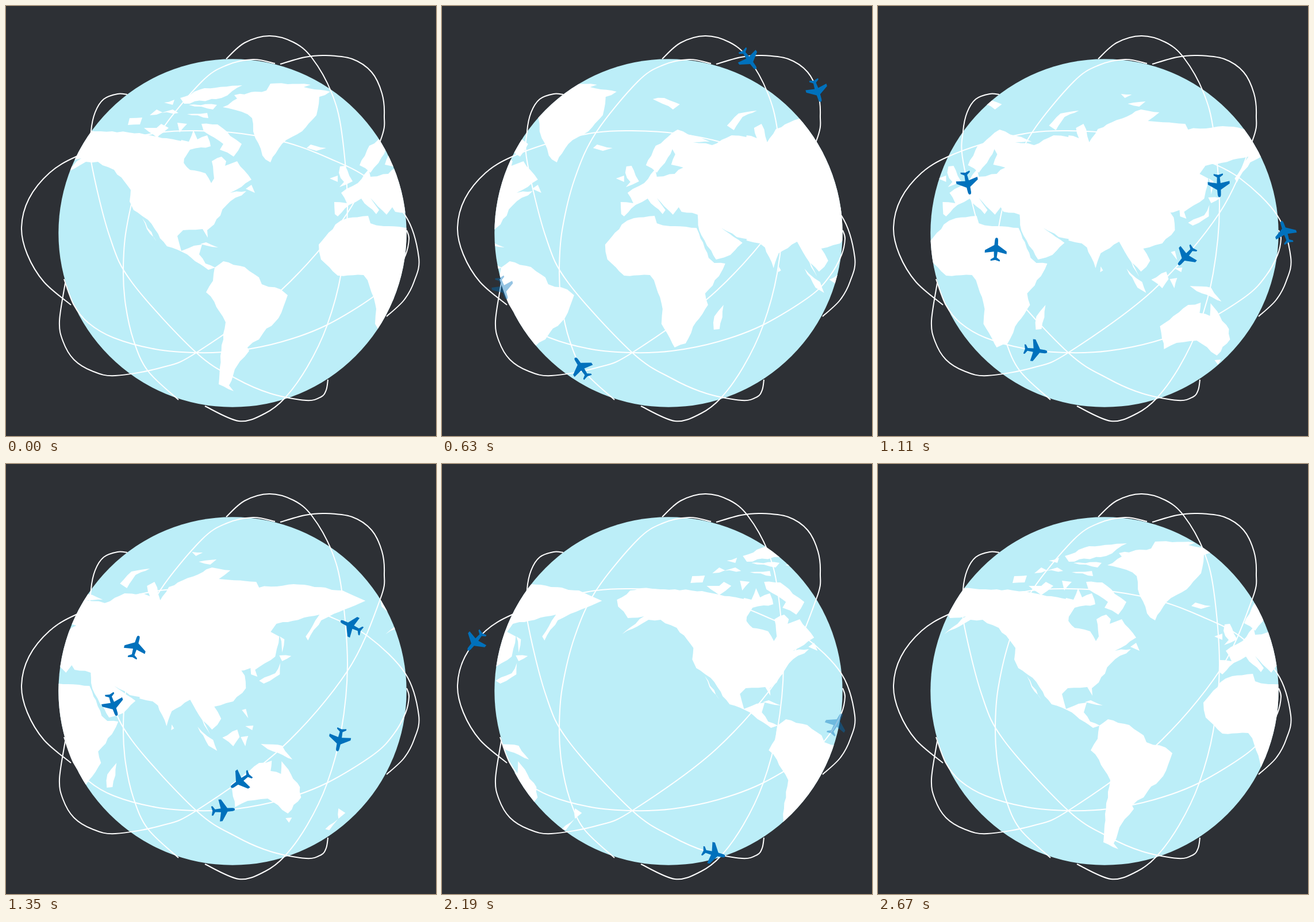
Recreate the animation shown at these times as an HTML page. Size 748x748 px, loop 2.7 s.

```html
<!DOCTYPE html>
<html lang="en">
<head>
<meta charset="utf-8">
<title>Flights around the globe</title>
<style>
  html, body { margin: 0; width: 100%; height: 100%; overflow: hidden; background: #2d3035; }
  svg { display: block; width: 100vw; height: 100vh; }
</style>
</head>
<body>
<svg viewBox="0 0 748 748">
  <defs><clipPath id="disc"><circle cx="394" cy="395" r="302.7"/></clipPath></defs>
  <circle cx="394" cy="395" r="302.7" fill="#bceef8"/>
  <g clip-path="url(#disc)">
    <g id="world" fill="#fff">
      <g id="map"></g>
      <use href="#map" x="1125"/>
    </g>
  </g>
  <g id="orbits" fill="none" stroke="#fff" stroke-width="2"></g>
  <g id="planes" fill="#0071bc"></g>
</svg>
<script>
const LOOP = 2700, STEP = 30, SCROLL = 0.4131, FADE = 120, CRUISE = 0.55;
const STOP_TIMES = [630, 900, 1350, 1800, 2190];
const $ = id => document.getElementById(id);

function add(parent, d) {
  const path = document.createElementNS('http://www.w3.org/2000/svg', 'path');
  path.setAttribute('d', d);
  return $(parent).appendChild(path);
}

const points = text => text.trim().split(/\s+/).map(p => p.split(',').map(Number));

let seed = 7;
const random = () => (seed = seed * 16807 % 2147483647) / 2147483647;

// Breaks long coast segments into slightly ragged ones
function ragged(pts) {
  return pts.flatMap((a, i) => {
    const b = pts[(i + 1) % pts.length];
    const n = Math.floor(Math.hypot(b[0] - a[0], b[1] - a[1]) / 9);
    const extra = Array.from({ length: Math.max(0, n - 1) }, (_, j) =>
      a.map((v, k) => v + (b[k] - v) * (j + 1) / n + (random() - 0.5) * 3));
    return [a, ...extra];
  });
}

// Coastlines; "/" separates islands, dx places the group on the map strip
function land(dx, coasts) {
  const d = coasts.split('/').map(c => `M${ragged(points(c)).join(' ')}Z`).join('');
  add('map', d).setAttribute('transform', `translate(${dx})`);
}

// North America, west and east
land(0, `107,220 126,216 232,221 318,238 309,275 335,300 298,400 305,426 327,417 341,415 336,432 347,448 364,455 352,459
  315,432 280,418 247,372 222,355 215,340 217,320 188,285 160,271 139,271 93,296 131,265 103,268 86,248 84,236
  / 237,369 262,410 245,388`);
land(0, `305,233 318,236 326,216 333,232 350,225 356,244 320,250 307,270 318,285 347,291 357,308 362,300 358,270 375,262
  383,270 381,278 402,270 427,302 390,325 418,322 383,347 362,380 350,390 351,403 342,388 308,390 298,400 280,340
  / 417,318 427,311 433,325 / 338,414 348,411 369,420`);
// Arctic islands
land(0, `215,195 237,194 233,206 212,207 / 240,212 262,212 270,205 283,212 262,228 / 250,190 262,180 272,185
  / 270,186 290,180 300,186 / 275,168 293,163 290,172 / 303,160 345,143 411,138 375,160 310,170
  / 318,172 367,172 360,180 / 315,188 350,186 352,195 / 298,203 315,205 302,220`);
land(0, '340,205 368,206 390,226 410,240 396,262 372,250 378,240 344,218');
// Greenland, Iceland
land(0, `377,176 402,161 397,155 453,147 460,135 530,137 518,141 564,149 545,158 540,190 515,218 480,240 460,272 446,260
  430,218 428,195 410,184 / 523,247 530,241 557,247 540,252`);
// South America
land(0, `363,455 378,444 415,454 440,472 445,484 478,493 490,503 474,543 448,568 440,580 420,594 423,600 407,618 398,632
  388,660 396,670 370,658 375,590 382,550 356,505 348,498 360,478`);
// Africa
land(372, `201,380 222,369 258,365 262,378 285,383 331,386 352,438 362,447 381,448 370,470 346,500 351,520 330,550
  312,587 293,594 270,553 272,527 257,477 250,468 205,469 176,441 172,415 / 378,520 371,562 361,563 362,540`);
// Europe and Arabia
land(372, `199,341 221,343 211,325 240,308 259,284 262,297 293,292 308,281 287,276 294,258 289,249 276,273 262,290 243,277
  260,243 298,215 354,236 325,237 358,242 392,225 418,228 445,235 445,409 401,402 374,386 411,412 390,433 365,441
  336,391 333,363 305,358 300,350 290,363 262,334 277,355 272,362 246,335 225,346 205,366 200,362`);
land(372, '207,290 209,279 218,278 231,305 208,315 216,306 / 191,300 205,295 205,306 / 255,162 275,160 302,171 290,180');
// Asia, north and south
land(558, `232,225 250,230 245,212 258,205 268,237 283,214 358,180 390,185 370,200 435,205 440,215 500,209 585,220 625,238
  580,257 548,272 525,307 521,300 545,262 490,275 470,278 460,292 475,300 468,335 433,358 437,370 426,366 425,355
  403,360 232,380`);
land(558, `232,350 403,350 415,368 417,390 395,413 362,422 374,443 358,462 343,447 355,471 330,428 320,410 288,430 279,456
  264,420 255,413 232,408`);
land(558, `288,453 292,460 287,463 / 476,300 484,305 480,328 / 475,333 496,334 480,343
  / 440,377 468,364 477,346 476,366 448,382 / 198,208 218,187 250,182 225,193 210,216
  / 323,153 342,154 330,160 / 335,170 366,166 355,175`);
// South-east Asia
land(558, `333,457 360,480 367,499 352,490 / 376,476 402,462 406,475 395,491 / 408,475 421,473 416,491
  / 410,428 417,426 421,442 / 416,456 430,455 428,463 / 443,487 480,490 498,514 455,496`);
// Oceania
land(558, `391,557 440,520 462,516 460,534 478,539 479,517 511,562 513,580 490,608 455,582 420,586 398,597
  / 486,616 497,615 492,624 / 578,599 590,607 578,617 / 577,618 562,637 555,635`);

// Smooth curve through points
function spline(pts) {
  const at = i => pts[Math.max(0, Math.min(pts.length - 1, i))];
  let d = `M${pts[0]}`;
  for (let i = 0; i < pts.length - 1; i++) {
    const [a, b, c, e] = [at(i - 1), at(i), at(i + 1), at(i + 2)];
    const c1 = b.map((v, k) => v + (c[k] - a[k]) / 6);
    const c2 = c.map((v, k) => v - (e[k] - b[k]) / 6);
    d += `C${c1} ${c2} ${c}`;
  }
  return d;
}

function nearestLength(path, [x, y]) {
  let best = 0, min = Infinity;
  for (let l = 0, total = path.getTotalLength(); l <= total; l++) {
    const p = path.getPointAtLength(l), dist = Math.hypot(p.x - x, p.y - y);
    if (dist < min) { min = dist; best = l; }
  }
  return best;
}

const half = points('20,0 19,2 16,2.8 7,3.2 -3,19 -7.5,19 -4.5,3.2 -14.5,2.4 -18.5,8.2 -21,8 -19,0');
const PLANE = `M${[...half, ...half.map(([x, y]) => [x, -y]).reverse()].join(' ')}Z`;

// An orbit and the plane that passes the stops between times from and to
const flights = [];
function flight(from, to, orbit, stops) {
  const path = add('orbits', spline(points(orbit)));
  const times = STOP_TIMES.filter(t => t > from);
  const keys = points(stops).map((p, i) => ({ t: times[i], l: nearestLength(path, p) }));
  const first = keys[0], last = keys[keys.length - 1];
  keys.unshift({ t: from, l: Math.max(0, first.l - (first.t - from) * CRUISE) });
  keys.push({ t: to, l: Math.min(path.getTotalLength(), last.l + (to - last.t) * CRUISE) });
  keys.forEach((k, i) => {
    const a = keys[Math.max(0, i - 1)], b = keys[Math.min(keys.length - 1, i + 1)];
    k.v = (b.l - a.l) / (b.t - a.t);
  });
  flights.push({ path, keys, from, to, icon: add('planes', PLANE) });
}

flight(150, 1825, '383,92 415,64 458,52 500,63 532,90 566,150 584,220 594,350 583,465 558,557 524,628 485,682 450,709 405,722 346,696',
  '535,93 575,182 579,480 405,721');
flight(440, 2150, '300,685 247,635 222,582 208,520 204,460 209,390 231,300 268,220 340,132 384,103 430,93 468,100',
  '243,628 207,518 228,319 316,157');
flight(230, 2150, `477,101 520,89 556,86 602,92 636,115 654,152 658,190 651,235 594,360 478,495 331,603 270,629 190,643
  150,635 118,615 99,583 93,548 103,482`, '652,148 622,311 408,552 150,634');
flight(700, 2430, '211,154 194,153 170,162 155,185 148,218 148,270 180,400 220,482 331,603 400,648 460,674 522,686 548,680 557,668 560,650',
  '148,210 185,419 326,598 473,678');
flight(850, 2560, `662,540 692,512 710,479 718,437 695,365 630,300 560,264 490,238 410,222 330,217 268,220 195,236 122,262
  76,290 40,335 27,385 37,432 66,480 113,520`, '685,517 600,281 287,217 58,309');
flight(580, 2240, '101,475 118,520 143,551 187,577 260,597 331,603 400,600 480,584 558,555 640,505 675,469 695,433 701,405 697,390',
  '104,492 187,576 378,604 570,551 686,452');

function place({ path, keys, from, to, icon }, t) {
  const alpha = Math.max(0, Math.min(1, (t - from) / FADE, (to - t) / FADE));
  icon.setAttribute('opacity', alpha);
  if (!alpha) return;
  const i = keys.findIndex(k => k.t > t), a = keys[i - 1], b = keys[i];
  const h = b.t - a.t, u = (t - a.t) / h, w = 1 - u;
  const l = w * w * ((1 + 2 * u) * a.l + u * h * a.v) + u * u * ((3 - 2 * u) * b.l - w * h * b.v);
  const p = path.getPointAtLength(l), back = path.getPointAtLength(l - 3), ahead = path.getPointAtLength(l + 3);
  const angle = Math.atan2(ahead.y - back.y, ahead.x - back.x) * 180 / Math.PI;
  icon.setAttribute('transform', `translate(${p.x} ${p.y}) rotate(${angle})`);
}

const start = performance.now();
function draw() {
  const t = Math.floor((performance.now() - start) % LOOP / STEP) * STEP;
  $('world').setAttribute('transform', `translate(${-SCROLL * t})`);
  flights.forEach(f => place(f, t));
  requestAnimationFrame(draw);
}
draw();
</script>
</body>
</html>
```
